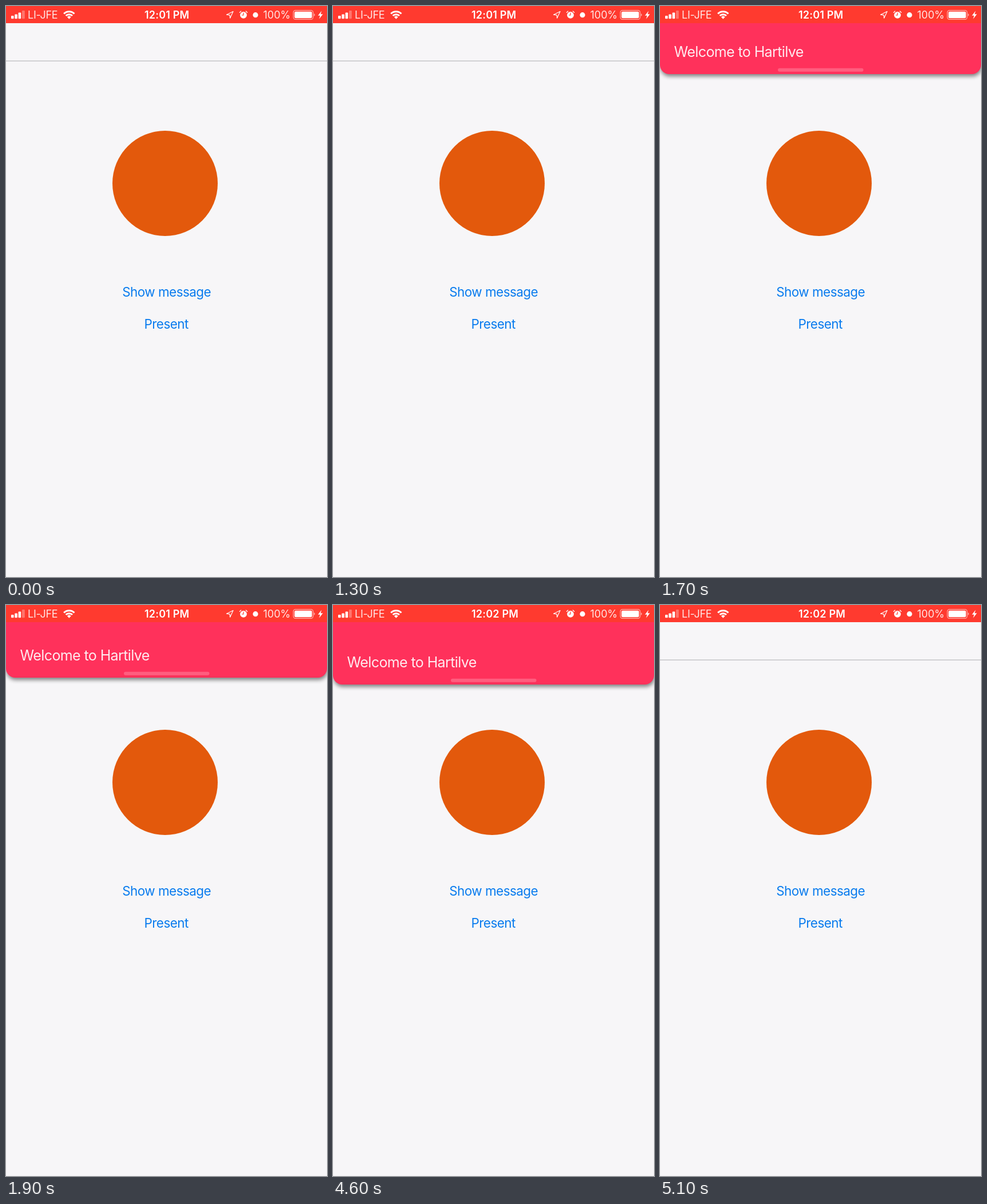
Recreate the animation shown at these times as an HTML page. Size 561x998 px, loop 5200 ms.

```html
<!DOCTYPE html>
<html lang="en">
<head>
<meta charset="utf-8">
<title>Notification banner</title>
<style>
  html, body { margin: 0; width: 100%; height: 100%; overflow: hidden; background: #f7f6f8; }
  svg { display: block; width: 100%; height: 100%; font-family: Inter, "Open Sans", sans-serif; }

  .button { font-size: 22.4px; letter-spacing: -.5px; text-anchor: middle; fill: #087bee; }
  .title { font-size: 25px; letter-spacing: -.6px; fill: #fff; fill-opacity: .9; }
  .status { font-size: 18px; fill: #fff; }
  .soft { fill-opacity: .88; }
  .carrier { letter-spacing: -.3px; }
  .clock { font-weight: 600; letter-spacing: .2px; }
  .line { fill: none; stroke: #fff; }

  /* One loop is 5.2 s on a 100 ms grid (1.923% per tick) */
  .banner, .press, .before, .after { animation: 5.2s step-end infinite; }
  .banner { animation-name: banner; filter: drop-shadow(1px 4px 3.5px rgba(0, 0, 0, .48)); }
  .press { animation-name: press; }
  .before { animation-name: before; }
  .after { animation-name: after; }

  @keyframes press {
    0% { opacity: 1; }
    17.3% { opacity: .3; }
    19.23% { opacity: .25; }
    21.15% { opacity: .5; }
    23.07% { opacity: .8; }
    25%, 100% { opacity: 1; }
  }

  /* Springs in, rests, is pulled down, then flicked away */
  @keyframes banner {
    0% { transform: translateY(-180px); }
    26.92% { transform: translateY(-35px); }
    28.84% { transform: translateY(36px); }
    30.76% { transform: translateY(11px); }
    32.69% { transform: translateY(-8px); }
    34.61% { transform: translateY(-2px); }
    36.53% { transform: translateY(0); }
    86.53% { transform: translateY(4px); }
    88.46% { transform: translateY(12px); }
    90.38% { transform: translateY(20px); }
    92.3% { transform: translateY(27px); }
    94.23% { transform: translateY(30px); }
    96.15% { transform: translateY(-42px); }
    98.07%, 100% { transform: translateY(-180px); }
  }

  @keyframes before { 0% { opacity: 1; } 71.15%, 100% { opacity: 0; } }
  @keyframes after { 0% { opacity: 0; } 71.15%, 100% { opacity: 1; } }
</style>
</head>
<body>
<svg viewBox="0 0 561 998">
  <rect width="561" height="998" fill="#f7f6f8"/>
  <rect y="95.5" width="561" height="1.1" fill="#b4b3b6"/>

  <circle cx="278" cy="310" r="92" fill="#e3590c"/>
  <text class="button press" x="280.7" y="507.5">Show message</text>
  <text class="button" x="280.2" y="564.3">Present</text>

  <g class="banner">
    <rect y="-200" width="561" height="327" rx="16" fill="#ff315b"/>
    <text class="title" x="24.5" y="96.7">Welcome to Hartilve</text>
    <rect x="206" y="116.7" width="149.5" height="6" rx="3" fill="#fff" fill-opacity=".22"/>
  </g>

  <g class="status">
    <rect width="561" height="30" fill="#ff3a2f"/>

    <!-- signal -->
    <rect x="9" y="17" width="4.6" height="5.2" rx="1"/>
    <rect x="15.3" y="14.6" width="4.6" height="7.6" rx="1"/>
    <rect x="21.6" y="11.4" width="4.6" height="10.8" rx="1"/>
    <rect x="28" y="8" width="4.8" height="14.2" rx="1" fill-opacity=".3"/>
    <text class="soft carrier" x="38" y="22">LI-JFE</text>

    <!-- wireless fan -->
    <g transform="translate(110.3 22.8)">
      <path class="line" stroke-width="2.9" d="M-9.2-9.2A13 13 0 0 1 9.2-9.2M-5.7-5.7A8 8 0 0 1 5.7-5.7"/>
      <path d="M0 0L-3.4-3.6A5 5 0 0 1 3.4-3.6Z"/>
    </g>

    <text class="clock before" x="242" y="22">12:01 PM</text>
    <text class="clock after" x="242" y="22">12:02 PM</text>

    <!-- location, alarm, radio -->
    <path class="line" stroke-width="1.2" stroke-linejoin="round" d="M397 9.5L385.5 15.2L391 15.8L391.6 21.2Z"/>
    <circle cx="415" cy="15.8" r="5.9"/>
    <path class="line" stroke-width="1.3" stroke-linecap="round" d="M408.3 11.4L410.8 9.1M421.7 11.4L419.2 9.1"/>
    <path fill="none" stroke="#ff3a2f" stroke-width="1.2" d="M415 11.8V16H412"/>
    <circle cx="436" cy="15.7" r="4.6"/>

    <text class="soft" x="449.5" y="22">100%</text>

    <!-- battery -->
    <rect class="line" x="502.2" y="7.7" width="34.5" height="15.6" rx="3.6" stroke-width="1.2" stroke-opacity=".6"/>
    <rect x="504.2" y="9.7" width="30.5" height="11.6" rx="2"/>
    <path fill-opacity=".6" d="M538.2 13A2.7 2.7 0 0 1 538.2 18Z"/>
    <path d="M551.6 8.6L545.2 16.8H549L547.2 22.8L553.8 14.3H549.8Z"/>
  </g>
</svg>
</body>
</html>
```
